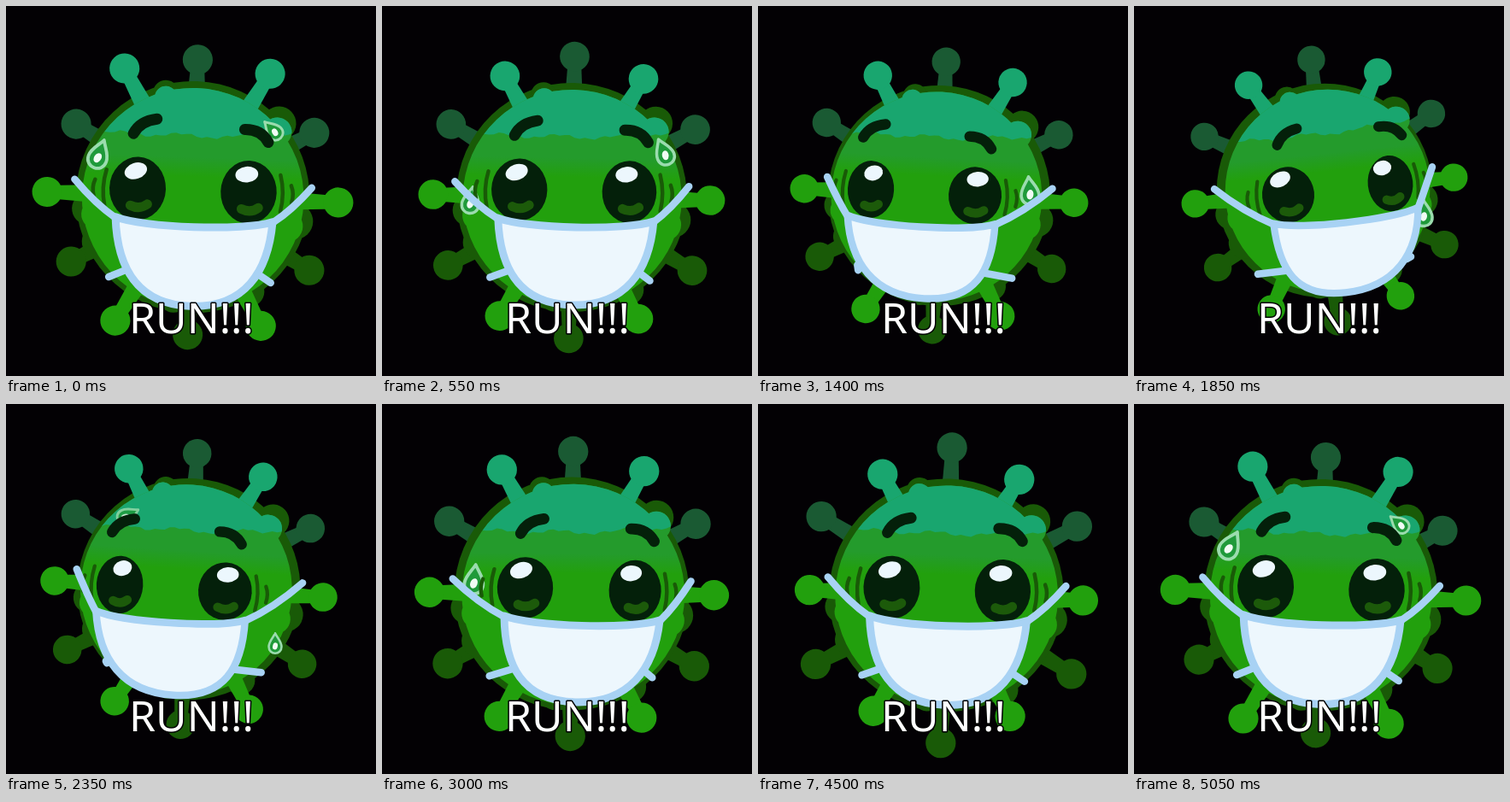
Recreate the animation shown at these times as an HTML page with a canvas. Size 433 px wide and 433 px high, loop 5100 ms.

```html
<!DOCTYPE html>
<html lang="en">
<head>
<meta charset="utf-8">
<title>RUN!!!</title>
<style>
html, body { margin: 0; width: 100%; height: 100%; overflow: hidden; background: #030104; }
canvas { display: block; width: 433px; height: 433px; }
</style>
</head>
<body>
<canvas id="stage" width="433" height="433"></canvas>
<script>
const ctx = document.getElementById('stage').getContext('2d');
const LOOP = 5100, STEP = 50, RAD = Math.PI / 180;
const C = {
  bg: '#030104', rim: '#195a07', teal: '#19a66f', mid: '#249b2c', leaf: '#22a00d',
  darkTeal: '#1a5a33', ink: '#04200a', shine: '#ecf7fd', mask: '#edf7fd', strap: '#a8d2f4'
};

// time, centre x/y, tilt, face x/y, face scale, face tilt, bright reach, dark reach
const POSES = [
  [0, 218.5, 223.7, 2.1, 1.5, 27, 1, 1.9, 170.5, 161],
  [560, 222, 224, 1.2, 5, 27, .99, 1.2, 162, 165],
  [1000, 226, 222.5, -4.2, 23.5, 25.5, .93, -5.3, 155.4, 159],
  [1400, 212, 222, 3, -21, 29, .94, 3.4, 158, 157],
  [1850, 223, 216, -5.8, 25, 30, .925, -6.4, 152, 154],
  [2350, 214, 216.5, 3.5, -21.5, 32, .95, 3.6, 157.3, 159],
  [2800, 224, 221.8, 1, 10, 29, .985, 1.8, 170.5, 160],
  [3000, 222, 222, .6, 12, 29.5, .99, 1.6, 166.5, 166.5],
  [3350, 221, 223.5, 1.5, 6, 28, 1, 1.7, 160, 172.5],
  [3900, 221, 223.5, 2.2, 2, 28, 1.03, 1.9, 174.5, 161.5],
  [4470, 220.5, 223.8, 2.2, 2, 28, 1, 1.9, 160, 173]
];

// time, x, y, size, tilt, opacity
const DROPS = [
  [[4750, 128, 140, .4, 50, 0], [4900, 122, 150, .8, 40, 1], [5050, 113, 165, 1, 28, 1],
   [5100, 109, 173, 1, 20, 1], [5660, 104, 228, .9, 8, 1], [6100, 128, 268, .75, -6, 1],
   [6300, 118, 285, .5, -6, 0]],
  [[2200, 150, 124, .5, 65, 0], [2350, 143, 130, .78, 62, .8], [3000, 108, 205, 1, 6, 1],
   [3500, 106, 255, .7, -5, 1], [3750, 112, 275, .4, -8, 0]],
  [[4850, 303, 130, .4, -50, 0], [5050, 310, 140, .76, -50, 1], [5100, 312, 145, .78, -45, 1],
   [6100, 337, 190, .98, -12, 1], [6500, 318, 216, .95, -5, 1], [6950, 339, 242, .9, -2, 1],
   [7450, 315, 280, .68, 0, 1], [7700, 314, 296, .4, 0, 0]]
];

const shift = (key, d) => [key[0] + d, ...key.slice(1)];
const TRACK = [
  ...POSES.slice(-2).map(k => shift(k, -LOOP)), ...POSES,
  ...POSES.slice(0, 2).map(k => shift(k, LOOP))
];

// Smooth interpolation that never overshoots its keys
function sample(keys, t) {
  let i = 0;
  while (i < keys.length - 2 && keys[i + 1][0] <= t) i++;
  const a = keys[i], b = keys[i + 1], h = b[0] - a[0], u = (t - a[0]) / h;
  const slope = (n, j) => keys[n] && keys[n + 1]
    ? (keys[n + 1][j] - keys[n][j]) / (keys[n + 1][0] - keys[n][0]) : 0;
  const tangent = (n, j) => {
    const p = slope(n - 1, j), q = slope(n, j);
    return p * q > 0 ? 2 * p * q / (p + q) : 0;
  };
  return a.slice(1).map((v, k) => {
    const j = k + 1, w = 1 - u;
    return v * (1 + 2 * u) * w * w + b[j] * u * u * (3 - 2 * u)
      + h * (tangent(i, j) * u * w * w - tangent(i + 1, j) * u * u * w);
  });
}

function disc(x, y, rx, ry, color, tilt = 0) {
  ctx.fillStyle = color;
  ctx.beginPath();
  ctx.ellipse(x, y, rx, ry, tilt * RAD, 0, 7);
  ctx.fill();
}

function curve(x0, y0, x1, y1, x2, y2, width, color) {
  ctx.strokeStyle = color;
  ctx.lineWidth = width;
  ctx.beginPath();
  ctx.moveTo(x0, y0);
  ctx.quadraticCurveTo(x1, y1, x2, y2);
  ctx.stroke();
}

function local(x, y, tilt, scale, draw) {
  ctx.save();
  ctx.translate(x, y);
  ctx.rotate(tilt * RAD);
  ctx.scale(scale, scale);
  draw();
  ctx.restore();
}

function turned(x, y, tilt) {
  const c = Math.cos(tilt * RAD), s = Math.sin(tilt * RAD);
  return [x * c - y * s, x * s + y * c];
}

function spikes(first, reach) {
  for (let i = first; i < 12; i += 2) {
    const up = i < 3 || i > 9;
    ctx.fillStyle = first ? (up ? C.teal : C.leaf) : (up ? C.darkTeal : C.rim);
    ctx.save();
    ctx.rotate(i * 30 * RAD);
    ctx.beginPath();
    ctx.moveTo(-7.5, -reach);
    ctx.lineTo(-10, -125);
    ctx.lineTo(10, -125);
    ctx.lineTo(7.5, -reach);
    ctx.fill();
    ctx.restore();
    const [x, y] = turned(0, -reach, i * 30);
    disc(x, y, 17.6, 17.6, ctx.fillStyle);
  }
}

function rim() {
  disc(0, 0, 137, 136, C.rim);
  const bumps = [[-36, -121, 15], [98, -90, 20], [-122, 18, 19], [121, 24, 21],
    [-108, 56, 20], [-18, 120, 16], [70, 108, 18]];
  for (const [x, y, r] of bumps) disc(x, y, r, r, C.rim);
}

function facePath(off) {
  ctx.beginPath();
  ctx.ellipse(off, 1, 130, 129, 0, 0, 7);
  for (const [x, y, r] of [[-36, -116, 13], [96, -80, 17], [-112, 24, 18], [111, 30, 19]]) {
    ctx.moveTo(x + off + r, y);
    ctx.arc(x + off, y, r, 0, 7);
  }
}

function skin(off) {
  ctx.save();
  facePath(off);
  ctx.clip();
  const g = ctx.createLinearGradient(0, -75, 0, -24);
  g.addColorStop(0, C.mid);
  g.addColorStop(.55, C.mid);
  g.addColorStop(1, C.leaf);
  ctx.fillStyle = g;
  ctx.fillRect(-170, -170, 340, 340);
  ctx.fillStyle = C.teal;
  ctx.beginPath();
  ctx.moveTo(-170, -170);
  ctx.lineTo(-170, -74);
  for (let x = -160; x <= 170; x += 6) {
    ctx.lineTo(x, -72 + 2.2 * Math.sin(x * .09) + 1.3 * Math.sin(x * .31) - (x > 60 ? 5 : 0));
  }
  ctx.lineTo(170, -170);
  ctx.fill();
  ctx.restore();
}

function drop([x, y, size, tilt, alpha]) {
  ctx.globalAlpha = Math.max(0, Math.min(1, alpha));
  local(x, y, tilt, size, () => {
    ctx.beginPath();
    ctx.moveTo(0, -17);
    ctx.bezierCurveTo(4, -9, 11, -3, 11, 6);
    ctx.bezierCurveTo(11, 21, -11, 21, -11, 6);
    ctx.bezierCurveTo(-11, -3, -4, -9, 0, -17);
    ctx.fillStyle = '#1f9a3a';
    ctx.fill();
    ctx.strokeStyle = '#9bdcae';
    ctx.lineWidth = 3.8;
    ctx.stroke();
    disc(0, 5, 4.2, 6, '#f0fbf4', 15);
  });
  ctx.globalAlpha = 1;
}

function eye(x, rx, side, turn, tall) {
  const y = -35, w = rx / 33;
  curve(x + side * 37 * w, y - 21, x + side * 43 * w, y, x + side * 38 * w, y + 22, 4.5, C.rim);
  curve(x + side * 50 * w, y - 9, x + side * 54 * w, y, x + side * 51 * w, y + 11, 4.5, C.rim);
  disc(x, y, rx, 37 * tall, C.ink);
  disc(x - 2.5 - turn * .22, y - 20.5, 13.5 * w, 9.3, C.shine, side < 0 ? -20 : -7);
  curve(x - 8 * w, y + 20, x + 3 * w, y + 25, x + 12 * w, y + 18, 11, '#1c5a0a');
}

function brow(x, side) {
  if (side < 0) curve(x - 11, -99, x - 4, -114, x + 16, -117, 13, C.ink);
  else curve(x - 11, -108, x + 8, -109, x + 17, -94, 13, C.ink);
}

function maskPath(low, depth) {
  ctx.beginPath();
  ctx.moveTo(-92, -1);
  ctx.bezierCurveTo(-60, 11, 60, 11, 92, -1);
  ctx.bezierCurveTo(89 + low * .3, 58, 63 + low, depth, low, depth);
  ctx.bezierCurveTo(-63 + low, depth, -88 + low * .3, 58, -92, -1);
  ctx.closePath();
}

function draw(t) {
  const [cx, cy, tilt, turn, fy, fs, ft, bright, dark] = sample(TRACK, t);
  const size = (bright + dark) / 332;
  const fx = cx + turn, faceY = cy + fy;
  const tall = 1 - Math.abs(turn) * .0018;
  ctx.lineCap = ctx.lineJoin = 'round';
  ctx.fillStyle = C.bg;
  ctx.fillRect(0, 0, 433, 433);

  local(cx, cy, tilt, size, () => {
    spikes(0, dark / size);
    rim();
    spikes(1, bright / size);
    skin(turn * .15);
  });

  for (const keys of DROPS) {
    for (const at of [t, t + LOOP]) {
      if (at >= keys[0][0] && at < keys[keys.length - 1][0]) drop(sample(keys, at));
    }
  }

  const lx = -67 - turn * .1, rx = 63 - turn * .1;
  local(fx, faceY, ft, fs, () => {
    eye(lx, 33 + Math.min(0, turn) * .2, -1, turn, tall);
    eye(rx, 33 - Math.max(0, turn) * .18, 1, turn, tall);
    brow(lx + 4 + Math.min(0, turn) * .3, -1);
    brow(rx + 4 + Math.min(0, turn) * .2, 1);
  });

  for (const side of [-1, 1]) {
    const hook = (x, y) => {
      const [px, py] = turned(side * x * size, y * size, tilt);
      return [cx + px, cy + py];
    };
    const seam = (x, y) => {
      const [px, py] = turned(side * x * fs, y * fs, ft);
      return [fx + px, faceY + py];
    };
    const [ax, ay] = hook(139, -16), [bx, by] = seam(92, 0);
    curve(ax, ay, ax * .55 + bx * .45 - side * 3, ay * .35 + by * .65, bx, by, 8.5, C.strap);
    const [dx, dy] = hook(95, 97), [ex, ey] = seam(76, 60);
    curve(dx, dy, (dx + ex) / 2, (dy + ey) / 2, ex, ey, 8.5, C.strap);
  }

  local(fx, faceY, ft, fs, () => {
    maskPath(-turn * .45, 101 - Math.abs(turn) * .2);
    ctx.fillStyle = C.mask;
    ctx.fill();
    ctx.strokeStyle = C.strap;
    ctx.lineWidth = 9;
    ctx.stroke();
  });

  ctx.font = '500 50px "Noto Sans", "Open Sans", sans-serif';
  ctx.textAlign = 'center';
  ctx.textBaseline = 'alphabetic';
  ctx.lineWidth = 3;
  ctx.strokeStyle = '#000';
  ctx.strokeText('RUN!!!', 217, 383);
  ctx.fillStyle = '#fff';
  ctx.fillText('RUN!!!', 217, 383);
}

const start = performance.now();
function tick() {
  const t = (performance.now() - start) % LOOP;
  draw(Math.floor(t / STEP) * STEP);
  requestAnimationFrame(tick);
}
tick();
</script>
</body>
</html>
```
